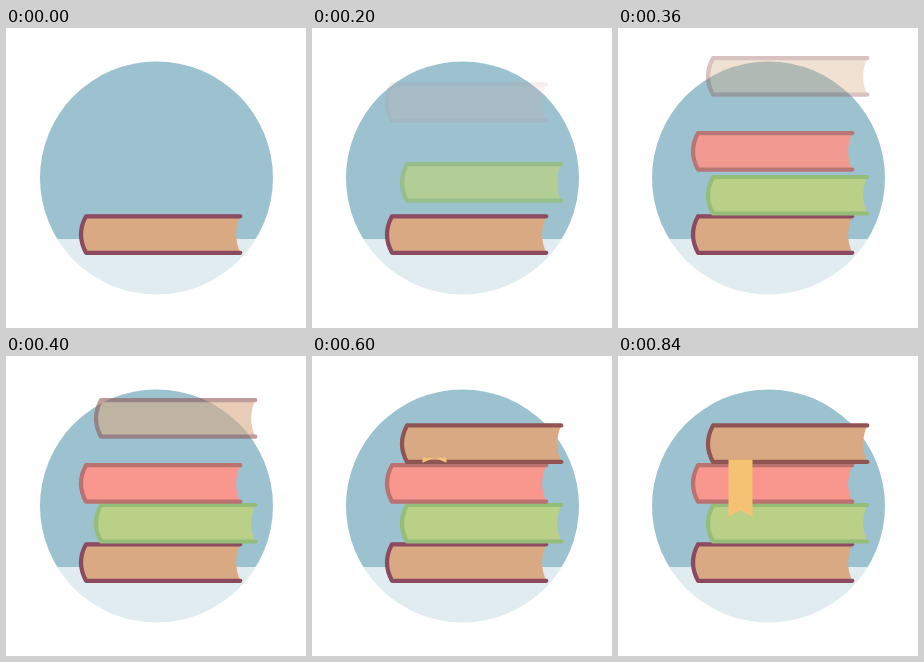
An HTML page with a canvas for the animation above (2000 ms loop, 300x300 px).

```html
<!DOCTYPE html>
<html lang="en">
<head>
<meta charset="utf-8">
<title>Stack of books</title>
<style>
html, body { margin: 0; width: 100%; height: 100%; overflow: hidden; background: #fff; }
canvas { display: block; width: 300px; height: 300px; }
</style>
</head>
<body>
<canvas id="stage" width="300" height="300"></canvas>
<script>
const SIZE = 300, LOOP = 2000, STEP = 40, FALL = 265, DROP = 60;
const ctx = document.getElementById('stage').getContext('2d');
const layer = document.createElement('canvas');
layer.width = layer.height = SIZE;
const lc = layer.getContext('2d');

const books = [
  { x: 0, y: 188.3, start: -FALL, fill: '#d9a983', line: '#8c4a60' },
  { x: 15, y: 149, start: 16, fill: '#b9d086', line: '#94bd7a' },
  { x: 0, y: 109.2, start: 140, fill: '#f9968e', line: '#b97270' },
  { x: 15, y: 69.4, start: 254, fill: '#d9a983', line: '#8f5552' }
];
const RIBBON_START = 556;

function ease(t, start) {
  const u = Math.min(1, Math.max(0, (t - start) / FALL));
  return (1 - Math.cos(Math.PI * u)) / 2;
}

function drawScene() {
  ctx.fillStyle = '#fff';
  ctx.fillRect(0, 0, SIZE, SIZE);
  ctx.save();
  ctx.beginPath();
  ctx.arc(150.5, 150, 116.5, 0, Math.PI * 2);
  ctx.clip();
  ctx.fillStyle = '#9cc2cf';
  ctx.fillRect(0, 0, SIZE, 211);
  ctx.fillStyle = '#e0ecf0';
  ctx.fillRect(0, 211, SIZE, SIZE - 211);
  ctx.restore();
}

// Spine and covers as one open outline, from the top right corner
function cover(h) {
  lc.beginPath();
  lc.moveTo(234.3, 0);
  lc.lineTo(80, 0);
  lc.quadraticCurveTo(70, h / 2, 80, h);
  lc.lineTo(234.3, h);
}

function drawBook(book, t) {
  const p = ease(t, book.start), h = 36.5;
  if (p <= 0) return;
  lc.clearRect(0, 0, SIZE, SIZE);
  lc.save();
  lc.translate(book.x, book.y - DROP * (1 - p));
  cover(h);
  lc.quadraticCurveTo(226, h / 2, 234.3, 0);
  lc.fillStyle = book.fill;
  lc.fill();
  cover(h);
  lc.strokeStyle = book.line;
  lc.lineWidth = 4.2;
  lc.lineCap = lc.lineJoin = 'round';
  lc.stroke();
  lc.restore();
  // Composite as a whole so the outline does not show through
  ctx.globalAlpha = p;
  ctx.drawImage(layer, 0, 0);
  ctx.globalAlpha = 1;
}

function drawRibbon(t) {
  const p = ease(t, RIBBON_START);
  if (p <= 0) return;
  const left = 110.5, right = 134.5;
  const top = 101.5 + 2 * p, bottom = 103 + 58 * p;
  const notch = Math.min(7, bottom - top);
  ctx.beginPath();
  ctx.moveTo(left, top);
  ctx.lineTo(right, top);
  ctx.lineTo(right, bottom);
  ctx.lineTo((left + right) / 2, bottom - notch);
  ctx.lineTo(left, bottom);
  ctx.closePath();
  ctx.fillStyle = '#f4c272';
  ctx.fill();
}

function render(now) {
  const t = Math.floor((now % LOOP) / STEP) * STEP;
  drawScene();
  books.forEach(book => drawBook(book, t));
  drawRibbon(t);
}

let begin = null;
function tick(now) {
  if (begin === null) begin = now;
  render(now - begin);
  requestAnimationFrame(tick);
}
render(0);
requestAnimationFrame(tick);
</script>
</body>
</html>
```
